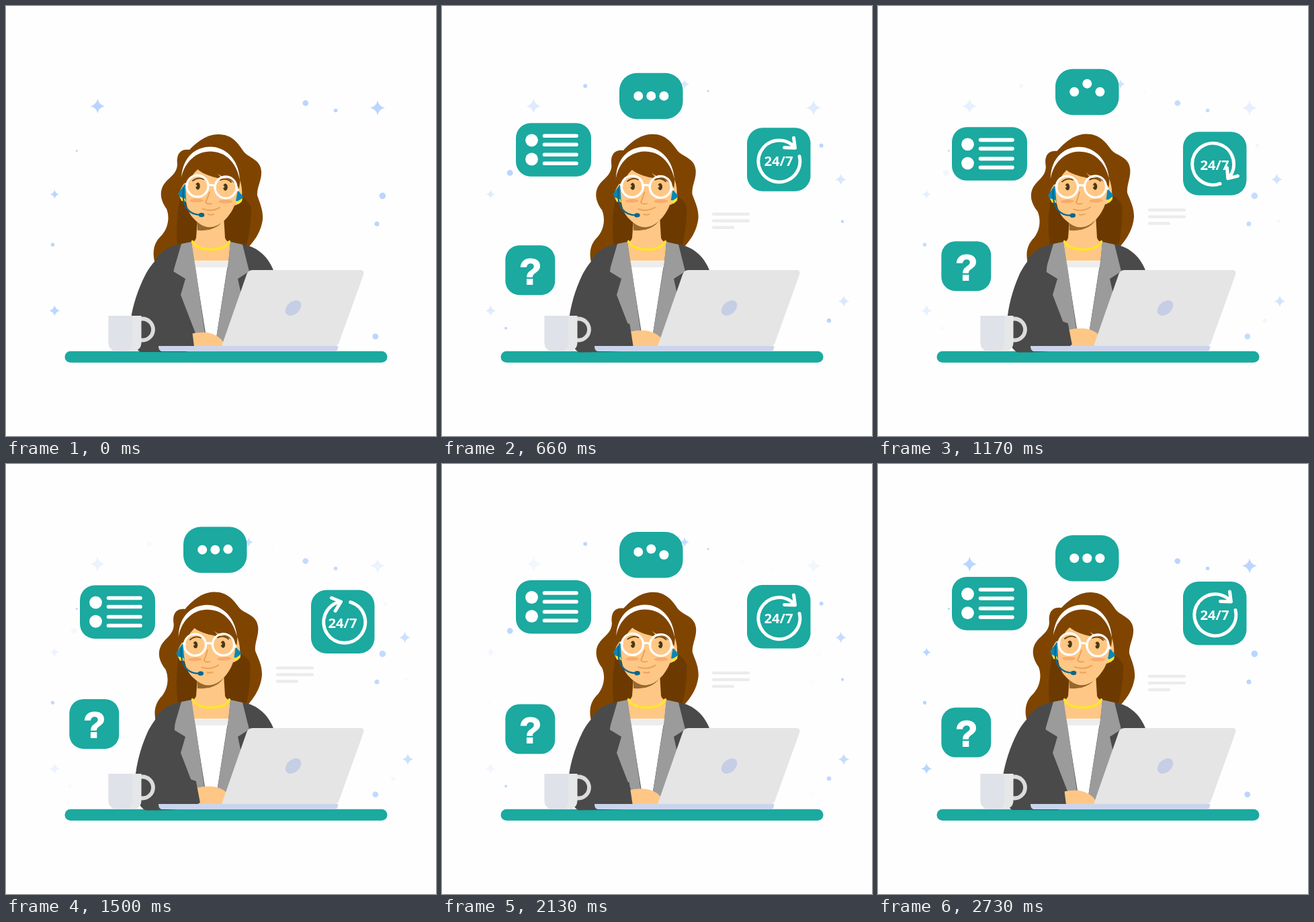
Animation, 640 px wide and 640 px high, one loop 2.76 s. Source, as an HTML page:

```html
<!DOCTYPE html>
<html lang="en">
<head>
<meta charset="utf-8">
<title>Support desk</title>
<style>
  html, body { margin: 0; width: 100%; height: 100%; overflow: hidden; background: #fefefe; }
  svg { display: block; width: 100vw; height: 100vh; }
  .teal { fill: #1ba9a0; }
  .skin { fill: #ffc785; }
  .hair { fill: #7f4500; }
  .jacket { fill: #4a4a4a; }
  .lapel { fill: #9b9b9b; }
  .white { fill: #fff; }
  .line { fill: none; stroke-linecap: round; stroke-linejoin: round; }
  .head { transform-origin: 305px 335px; }
  .arm { transform-origin: 235px 370px; }
  .card { transform-box: fill-box; }
  #chat { transform-origin: 50% 100%; }
  #list { transform-origin: 100% 100%; }
  #hours, #note { transform-origin: 0 100%; }
  #help { transform-origin: 100% 0; }
  text { fill: #fff; text-anchor: middle; }
</style>
</head>
<body>
<svg viewBox="0 0 640 640" xmlns="http://www.w3.org/2000/svg">
  <defs>
    <clipPath id="aboveDesk"><rect width="640" height="515.5"/></clipPath>
  </defs>

  <g id="sparks" fill="#bad5ff"></g>

  <g id="note" class="card line" stroke="#ececec" stroke-width="4.4">
    <path d="M404 316H456M404 326H456M404 336H433"/>
  </g>

  <rect class="teal" x="87.5" y="513.7" width="480" height="17" rx="8.5"/>

  <g class="head">
    <path class="hair" d="M316 191C337 191 346 205 354 217C361 226 379 228 380 246C381 259 373 270 374 282C378 294 383 304 382 318C379 340 366 353 360 360L285 375L221 380C217 362 222 350 232 341C243 328 243 312 239 302C229 288 229 276 234 267C241 255 254 252 255 236C253 220 260 212 273 214C284 203 298 191 316 191Z"/>
    <path fill="#6c3a00" d="M262 270C256 300 252 325 255 356L357 358C362 345 366 310 365 300C363 290 350 284 348 280Z"/>
  </g>

  <g id="body">
    <path class="jacket" d="M262 354L276 351H334L352 355C375 358 392 375 399 396L330 506H230L225 400L222 378C233 362 248 356 262 354Z"/>
    <path class="skin" d="M285 318L283 345Q282 350 276 352L280 382H331L334 352Q327 350 326 345L324 312Z"/>
    <path fill="#96682f" d="M285 318V334C300 335 317 331 324 318Z"/>
    <path class="white" d="M280 379H331L314 487L312 506H299L297 487Z"/>
    <path fill="#ededed" d="M280 379.5H331.5L330 389H282Z"/>
    <path class="lapel" d="M261 354L276 351L283 395L296 487L299 506H290L282 487L260 430L267 406L249 395Z"/>
    <path class="lapel" d="M334 351L352 355L362 395L345 406L350 429L322 506H312L314 487L330 388Z"/>
    <g class="line" stroke="#ffe62a">
      <path id="chain" stroke-width="3.4" d="M277.5 350.5Q283 362 305 362.5Q327 362 332.5 350.5"/>
      <use href="#chain" stroke-width="4.4" stroke-dasharray="0 4.5"/>
    </g>
  </g>

  <g class="head">
    <path class="skin" d="M267 262C255 276 255 290 268 291C270 303 273 310 279 316C288 326 297 330 305 329C320 328 334 312 340 297C353 295 354 275 347 255L300 228Z"/>
    <path fill="#0a86b4" d="M256 279L267 264L268 290H262ZM342 290L345 274L353 284L349 291Z"/>
    <path fill="#ffe531" d="M259 284L267 287V291L261 290ZM341 293L352 286L351 291L346 295Z"/>
    <path class="hair" d="M262 258L268 266C274 258 280 250 283 241C292 250 305 254 323 258C319 254 316 251 314 248C320 256 338 256 347 272L349 255C345 228 326 213 304 213C283 213 264 230 262 258Z"/>
    <path class="white" d="M261 255C263 225 282 209.500 304 209.500C328 209.500 347 230 348 259C343 232 326 216.500 304 216.500C283 216.500 266 232 261 255Z"/>
    <g fill="#f9ab6b"><ellipse cx="284" cy="289.5" rx="10" ry="2.7"/><ellipse cx="327" cy="291" rx="10.5" ry="2.7"/></g>
    <g fill="#4b3714">
      <ellipse cx="285.5" cy="268" rx="3.3" ry="5.2"/><ellipse cx="326.5" cy="269.5" rx="3.3" ry="5.2"/>
    </g>
    <g class="skin"><circle cx="282.8" cy="267.5" r="1.5"/><circle cx="323.8" cy="269" r="1.5"/></g>
    <path class="line" d="M278 260Q286 254 294 258M319 259Q328 255 335 262" stroke="#6b3a00" stroke-width="1.8"/>
    <path class="line" d="M303 277Q300 286 297 292Q300 296 306 294" stroke="#e79d58" stroke-width="1.7"/>
    <path class="line" d="M293 302Q306 307 318 300M301 310Q305 311.500 309 310" stroke="#eca45f" stroke-width="2.2"/>
    <g class="line" stroke="#fff" stroke-width="3.3">
      <circle cx="285" cy="268" r="16"/><circle cx="327" cy="270" r="16"/>
      <path d="M301 267Q306 265.500 311 268M268 265L270 266M343 273L345 274"/>
    </g>
    <path class="line" d="M264 271C261 299 272 311 291 311" stroke="#0b668d" stroke-width="2.2"/>
    <ellipse cx="291" cy="311" rx="4.3" ry="3.2" fill="#0b668d"/>
  </g>

  <path id="hand" class="skin" d="M274 488Q292 484 304 487Q318 491 323 500V513.500H274Z"/>
  <g clip-path="url(#aboveDesk)">
    <path class="arm jacket" d="M254 362C238 362 221 376 208 399C196 422 189 445 186 465C183 485 184 505 200 515H268L280 507L276 475L240 460Z"/>
  </g>

  <path fill="#e5e5e5" d="M367 393H527Q534 393 532 400L496 500Q494 506 490 506H321L358 400Q360 393 367 393Z"/>
  <ellipse cx="427.5" cy="449.5" rx="13.5" ry="9.3" transform="rotate(-42 427.5 449.5)" fill="#c6cee5"/>
  <path fill="#cad5ed" d="M227 506H494.500Q494 514 489 514H233Q227 514 227 506Z"/>

  <circle class="line" cx="203" cy="481.5" r="16" stroke="#dcdcdc" stroke-width="5.8"/>
  <path fill="#e6e7e8" d="M152.500 461H201.500V500Q201.500 513.500 188 513.500H166Q152.500 513.500 152.500 500Z"/>
  <path fill="#dfe2e8" d="M152.500 461H188V500Q188 513.500 176 513.500H166Q152.500 513.500 152.500 500Z"/>

  <g id="list" class="card">
    <rect class="teal" x="110" y="168" width="112" height="79.5" rx="22"/>
    <g class="white"><circle cx="133.5" cy="193.5" r="9.4"/><circle cx="133.5" cy="221.7" r="9.4"/></g>
    <path class="line" d="M152.500 187H200M152.500 200H200M152.500 215H200M152.500 228H200" stroke="#fff" stroke-width="5.6"/>
  </g>

  <g id="chat" class="card">
    <rect class="teal" x="264" y="106" width="94.5" height="68.5" rx="26"/>
    <g class="white">
      <circle class="dot" cx="292.2" cy="140.2" r="7"/>
      <circle class="dot" cx="311.3" cy="140.2" r="7"/>
      <circle class="dot" cx="330.4" cy="140.2" r="7"/>
    </g>
  </g>

  <g id="hours" class="card">
    <rect class="teal" x="454" y="175" width="94.5" height="94.5" rx="23"/>
    <text x="501" y="231.7" font-family="'Open Sans', sans-serif" font-weight="700" font-size="20.3">24/7</text>
    <g transform="translate(501.2 222)">
      <path id="arrow" class="line" stroke="#fff" stroke-width="5" d="M30.800 -4.500A31 31 0 1 1 23.300 -18.500M22.300 -32L24.300 -17L8.300 -17.500"/>
    </g>
  </g>

  <g id="help" class="card">
    <rect class="teal" x="94.3" y="362.5" width="74" height="74" rx="21"/>
    <g transform="translate(131.8 399.7)">
      <text id="mark" y="20.3" font-family="'Liberation Sans', Arial, sans-serif" font-weight="700" font-size="54" stroke="#fff" stroke-width="1.8">?</text>
    </g>
  </g>
</svg>

<script>
const TICK = 30, TICKS = 92;
const EASE = 'cubic-bezier(.333, 0, .667, 1)';
const $ = id => document.getElementById(id);

// Loops one CSS property through [tick, value] stops, holding at both ends.
function play(el, prop, stops) {
  const all = [...stops];
  if (all[0][0] > 0) all.unshift([0, all[0][1]]);
  if (all.at(-1)[0] < TICKS) all.push([TICKS, all.at(-1)[1]]);
  el.animate(
    all.map(([tick, value]) => ({ offset: tick / TICKS, [prop]: value, easing: EASE })),
    { duration: TICK * TICKS, iterations: Infinity });
}

const sway = (el, prop, rest, far) => play(el, prop, [[0, rest], [45, far], [90, rest]]);

// Cards: [id, drift in px, tick at which it pops out]
[['note', -13, 0], ['hours', 13, 2], ['list', 13, 4], ['chat', -13, 5], ['help', -13, 6]]
  .forEach(([id, drift, start]) => {
    sway($(id), 'translate', '0px 0px', `0px ${drift}px`);
    play($(id), 'scale', [[start, '0'], [start + 15, '1']]);
  });

document.querySelectorAll('.head').forEach(el => sway(el, 'rotate', '0deg', '-3.2deg'));
sway(document.querySelector('.arm'), 'rotate', '0deg', '-3.9deg');
sway($('hand'), 'translate', '0px 0px', '9.8px -6.3px');

// Typing dots hop one after another, twice per loop.
document.querySelectorAll('.dot').forEach((dot, i) => {
  const low = '0px 0px', high = '0px -12.2px', half = 6.15;
  play(dot, 'translate', [27, 61.2].flatMap(wave => {
    const start = wave + i * 5.85;
    return [[start, low], [start + half, high], [start + 2 * half, low]];
  }));
});

play($('mark'), 'rotate', [27, 61].flatMap(start =>
  [[start, '0deg'], [start + 4, '6deg'], [start + 7, '-6deg'], [start + 10, '0deg']]));
play($('arrow'), 'rotate', [[31, '0deg'], [56.7, '360deg']]);

// Sparks: stars and dots twinkle in two opposite sets each.
const STAR = 'M0-1Q.17-.17 1 0Q.17.17 0 1Q-.17.17-1 0Q-.17-.17 0-1';
const DISC = 'M-1 0A1 1 0 1 1 1 0A1 1 0 1 1-1 0';

function twinkle(shape, half, from, spots) {
  const group = document.createElementNS('http://www.w3.org/2000/svg', 'g');
  group.innerHTML = spots.map(([x, y, r]) =>
    `<path d="${shape}" transform="translate(${x} ${y}) scale(${r})"/>`).join('');
  $('sparks').append(group);
  const stops = [];
  for (let i = 0; i * half <= 90; i++) stops.push([i * half, i % 2 ? 1 - from : from]);
  play(group, 'opacity', stops);
}

twinkle(STAR, 15, 1, [[136.3, 149, 11], [553, 151.5, 11], [72.3, 280.3, 6.8], [72.3, 453.5, 8.2]]);
twinkle(STAR, 15, 0, [[361, 116.2, 7], [593.6, 258.2, 8.5], [598, 439.5, 8.5]]);
twinkle(DISC, 22.5, 1, [[445.8, 144.5, 4.3], [490.6, 155.5, 2.8], [105.3, 215.5, 1.6],
  [560.4, 282.6, 4.8], [552, 324.2, 3.5], [69.5, 355.2, 2.7], [549.8, 491.8, 4.4]]);
twinkle(DISC, 22.5, 0, [[213.2, 119, 3], [396.2, 126.7, 1.6], [101.2, 248.3, 4.4],
  [564.6, 207.8, 3], [596, 320.7, 2.2], [576, 468.2, 3.2], [95, 479.5, 2]]);
</script>
</body>
</html>
```
